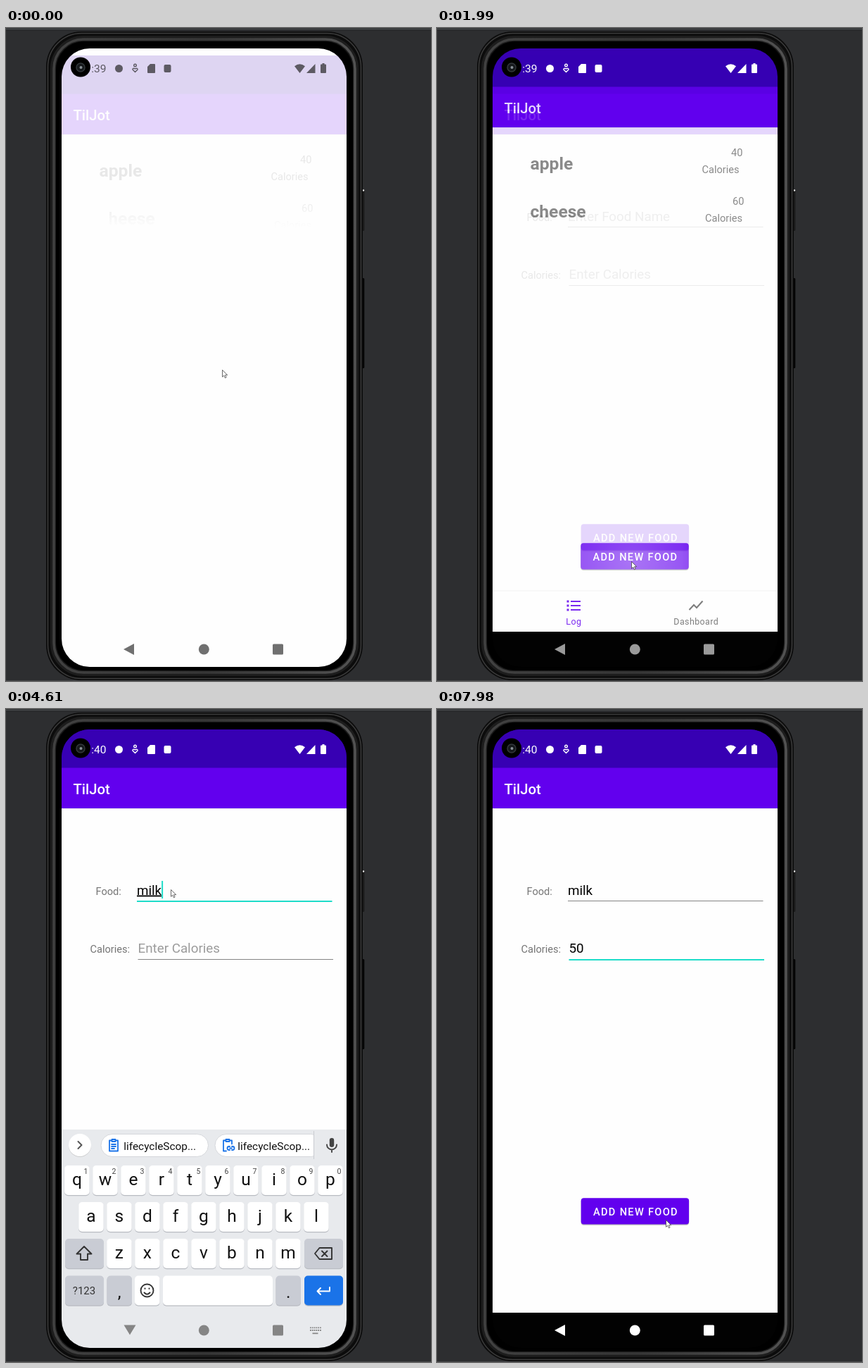
These frames come from a looping animation (604 px wide and 927 px high, 8 s). An HTML page:

```html
<!DOCTYPE html>
<html lang="en">
<head>
<meta charset="utf-8">
<title>Food log</title>
<style>
html, body { margin: 0; width: 604px; height: 927px; overflow: hidden; background: #2d2e30; }
svg { display: block; }
text { font-family: Roboto, sans-serif; white-space: pre; }
.grey { fill: #757575; }
.small { font-size: 14.6px; }
.food { font-size: 24.6px; font-weight: 700; }
.field { font-size: 18.8px; }
.hint { fill: #9c9c9c; }
.btn { font-size: 14.6px; font-weight: 500; letter-spacing: 1.31px; fill: #fff; }
.tab { font-size: 12.4px; letter-spacing: .45px; text-anchor: middle; }
.key { font-size: 24.5px; text-anchor: middle; fill: #111; }
.num { font-size: 10.5px; text-anchor: middle; fill: #444; }
.chip { font-size: 15.4px; fill: #111; }
.line { fill: none; stroke-linecap: round; stroke-linejoin: round; }
</style>
</head>
<body>
<svg width="604" height="927" viewBox="0 0 604 927">
  <defs>
    <clipPath id="screen"><rect x="79" y="29" width="405" height="878" rx="40"/></clipPath>
    <clipPath id="windowClip"><rect x="79" y="29" width="405" height="828"/></clipPath>
    <clipPath id="btnClip"><rect x="204.300" y="731.200" width="153.400" height="37.200" rx="4"/></clipPath>
    <clipPath id="chipClip"><rect x="79" y="597" width="358.500" height="60"/></clipPath>
    <radialGradient id="glow">
      <stop offset="0" stop-color="#fff" stop-opacity=".36"/>
      <stop offset=".6" stop-color="#fff" stop-opacity=".22"/>
      <stop offset="1" stop-color="#fff" stop-opacity="0"/>
    </radialGradient>
    <linearGradient id="fade" x2="0" y2="1">
      <stop offset="0" stop-color="#fefefe" stop-opacity="0"/>
      <stop offset=".07" stop-color="#fefefe"/>
    </linearGradient>
    <linearGradient id="rim" x2="1" y2="0">
      <stop offset="0" stop-color="#414141"/>
      <stop offset=".5" stop-color="#363636"/>
      <stop offset="1" stop-color="#525252"/>
    </linearGradient>
    <g id="bars">
      <rect x="79" y="141" width="405" height="716" fill="#fefefe"/>
      <rect x="79" y="141" width="405" height="1" opacity=".08"/>
      <rect x="79" y="29" width="405" height="55" fill="#3700b3"/>
      <rect x="79" y="83.500" width="405" height="57.500" fill="#6200ee"/>
      <text x="95.500" y="120.500" font-size="20.300" font-weight="500" fill="#fff">TilJot</text>
    </g>
    <g id="button">
      <rect x="204.300" y="733" width="153.400" height="37.200" rx="4" opacity=".1"/>
      <rect x="204.300" y="732.200" width="153.400" height="37.200" rx="4" opacity=".2"/>
      <rect x="204.300" y="731.200" width="153.400" height="37.200" rx="4" fill="#6200ee"/>
    </g>
  </defs>

  <rect width="604" height="927" fill="#2d2e30"/>
  <rect width="604" height="3" fill="#3b3d3f"/>
  <rect y="3" width="604" height="1" fill="#222325"/>

  <!-- phone body -->
  <rect x="505" y="230" width="4.300" height="58" rx="1.500" fill="#1a1a1a"/>
  <rect x="505" y="355" width="4.300" height="128" rx="1.500" fill="#050505"/>
  <circle cx="508" cy="230.500" r="1.200" fill="#eee"/>
  <rect x="57" y="5" width="450" height="921" rx="50" fill="#0c0c0c"/>
  <rect x="59.500" y="7.500" width="445" height="916" rx="48" class="line" stroke="#3c3c3c" stroke-width="1.500"/>
  <rect x="67" y="15" width="430" height="901" rx="43" class="line" stroke="#1d1d1d" stroke-width="8"/>
  <rect x="68" y="16" width="428" height="899" rx="42" class="line" stroke="url(#rim)" stroke-width="3.500"/>
  <rect x="71" y="19" width="422" height="893" rx="41"/>
  <rect y="926" width="604" height="1" fill="#454648"/>

  <g clip-path="url(#screen)">
    <rect id="base" x="79" y="29" width="405" height="828" fill="#fefefe"/>
    <rect id="navBg" x="79" y="857" width="405" height="50"/>

    <g clip-path="url(#windowClip)">
      <g id="log">
        <use href="#bars"/>
        <g class="grey">
          <text x="132.500" y="200.500" class="food">apple</text>
          <text x="132.500" y="269" class="food">cheese</text>
          <g class="small">
            <text x="418" y="182">40</text><text x="376.500" y="206">Calories</text>
            <text x="420" y="250.500">60</text><text x="381" y="274.500">Calories</text>
          </g>
        </g>
        <use href="#button"/>
        <g clip-path="url(#btnClip)"><circle id="ripple" cx="276" cy="755" r="0" fill="url(#glow)"/></g>
        <text x="221.500" y="755.500" class="btn">ADD NEW FOOD</text>
        <rect x="79" y="798.500" width="405" height="1" fill="#f1f1f1"/>
        <g fill="#6200ee">
          <path d="M184.500 812.500h3v3h-3zm5.500 .5h14v2h-14zm-5.500 5.500h3v3h-3zm5.500 .5h14v2h-14zm-5.500 5.500h3v3h-3zm5.500 .5h14v2h-14z"/>
          <text x="194.300" y="847" class="tab">Log</text>
        </g>
        <path d="M358.500 826l6.500-7 4 4 8.500-9.500" fill="none" stroke="#666" stroke-width="2"/>
        <text x="368.300" y="847" class="tab" fill="#666">Dashboard</text>
      </g>
      <g id="veil">
        <rect x="79" y="238" width="405" height="662" fill="url(#fade)"/>
        <rect x="130" y="252" width="17" height="32" fill="#fefefe"/>
      </g>

      <g id="form">
        <use href="#bars"/>
        <text x="127.500" y="264" class="small grey">Food:</text>
        <text x="119.500" y="346" class="small grey">Calories:</text>
        <rect id="foodLine" x="186" width="277.500"/>
        <rect id="calLine" x="187.500" width="277.500"/>
        <text id="food" x="186" y="263.500" class="field"></text>
        <text id="cal" x="187.500" y="346" class="field"></text>
        <rect id="caret" width="2" height="25" fill="#1fdcc9"/>
        <use href="#button" x=".4" y="-37"/>
        <text x="222" y="718.500" class="btn">ADD NEW FOOD</text>
      </g>
    </g>

    <g id="keyboard">
      <rect x="79" y="597" width="405" height="330" fill="#e8eaed"/>
      <circle cx="105" cy="620" r="16" fill="#bbb" opacity=".6"/>
      <circle cx="105" cy="619" r="16" fill="#fff"/>
      <path d="M102.500 614l5 5-5 5" class="line" stroke="#555" stroke-width="2"/>
      <g clip-path="url(#chipClip)">
        <g id="chipA"></g>
        <g id="chipB"></g>
      </g>
      <rect x="437" y="599" width="1" height="40" fill="#c9cbd0"/>
      <rect x="459.800" y="609" width="6.400" height="13" rx="3.200" fill="#444"/>
      <path d="M456 618.500a7 7 0 0 0 14 0M463 626v3" class="line" stroke="#444" stroke-width="1.900"/>
      <g id="keys"></g>
      <g class="line" stroke="#333" stroke-width="1.900">
        <path d="M111 763l-10.500 10.500h5.500v8.500h10v-8.500h5.500z"/>
        <path d="M445.500 765h17.500v16h-17.500l-6.500-8zM449 769.500l7.500 7.500m0-7.500l-7.500 7.500"/>
        <circle cx="200.500" cy="825.500" r="9"/>
        <path d="M196.500 828.500q4 4.500 8 0M197.500 822.500v.5M203.500 822.500v.5"/>
        <path d="M460 821v5.500h-17.500m4.500-4.500l-4.500 4.500 4.500 4.500" stroke="#fff"/>
      </g>
    </g>

    <g id="nav">
      <path id="back"/>
      <circle cx="281.300" cy="882" r="7.500"/>
      <rect x="379" y="874.500" width="15" height="15" rx="1.500"/>
      <g id="switcher"></g>
    </g>

    <g id="status">
      <text id="clock" x="142.500" y="63" font-size="15.500" text-anchor="end"></text>
      <circle cx="160.500" cy="57.500" r="5.500"/>
      <g fill="none" stroke="currentColor" stroke-width="1.400">
        <circle cx="183.500" cy="53" r="1.800"/>
        <path d="M183.500 62.500l-3.600-3.600q0-2.600 3.600-1 3.600-1.600 3.600 1z"/>
      </g>
      <path d="M205 51h6q1 0 1 1v11q0 1-1 1h-9q-1 0-1-1v-8z"/>
      <rect x="224.500" y="52" width="10" height="11" rx="2"/>
      <path d="M410 54.300q7.500-6 15 0l-7.500 9.700zM427 64l12.500-13v13zM447 52.500q0-1 1-1h1.500v-1.500h3v1.500h1.500q1 0 1 1v10.500q0 1-1 1h-6q-1 0-1-1z"/>
    </g>
  </g>

  <circle cx="106" cy="55.500" r="14"/>
  <circle cx="106" cy="56" r="6" fill="#16191c" stroke="#33383c" stroke-width="1.500"/>
  <circle cx="106.500" cy="56" r="2" fill="#8a9298"/>

  <path id="cursor" d="M.5 .5v9.800l2.300-2 1.600 3.500 1.700-.8-1.600-3.300h3.200z" fill="#fff" stroke="#444" stroke-width=".8"/>
</svg>
<script>
const LOOP = 8000;
const TEAL = '#1fdcc9';
const $ = id => document.getElementById(id);
const set = (id, attrs) => {
  for (const k in attrs) $(id).setAttribute(k, attrs[k]);
};

// Each track lists [start ms, value...]; a value holds until the next start.
const tracks = {
  cursor: [[0, 307, 485], [870, 332, 530], [990, 361, 610], [1110, 346, 662], [1250, 275, 766],
    [1500, 276, 757], [2110, 265, 600], [2230, 245, 400], [2350, 234, 256],
    [6760, 258, 420], [6880, 273, 640], [7000, 255, 820], [7120, 205, 908], [7240, 175, 892],
    [7360, 173, 883], [7620, 190, 860], [7740, 260, 790], [7860, 318, 738], [7980, 325, 725]],
  log: [[0, .16, 10], [120, .65, 4], [240, 1, 0]],
  form: [[0, 0, 10], [1990, .16, 10], [2110, .7, 4], [2230, 1, 0]],
  keyboard: [[0, 0, 310], [2590, .38, 175], [2710, .85, 50], [2830, 1, 0],
    [7500, .9, 25], [7620, .6, 110], [7740, .2, 220], [7860, 0, 310]],
  chips: [[0, .4], [2710, .8], [2830, 1]],
  navBg: [[0, '#fefefe'], [120, '#5a5a5a'], [240, '#020202']],
  nav: [[0, '#707070'], [120, '#666'], [240, '#5c5c5c'], [500, '#9a9a9a'], [2590, '#b4b4b4'],
    [2710, '#999'], [2830, '#858585'], [7620, '#aaa'], [7740, '#ddd'], [7860, '#fff']],
  status: [[0, '#5d5a63'], [120, '#36284f'], [240, '#1f0b58'], [500, '#fff']],
  ripple: [[0, 0], [1750, 30], [1870, 70], [1990, 120]],
  clock: [[0, '1:39'], [2350, '1:40']],
  food: [[0, ''], [3980, 'm'], [4230, 'mi'], [4370, 'mil'], [4610, 'milk']],
  cal: [[0, ''], [6020, '5'], [6140, '50']],
  caret: [[0, 0], [2470, 1], [3080, 0], [3460, 1], [5750, 0], [6020, 1], [6640, 0], [7120, 1], [7620, 0]]
};
const at = (name, t) => tracks[name].findLast(k => k[0] <= t).slice(1);

function key(x, y, w, fill, label = '', cls = 'key', dy = 28) {
  return `<rect x="${x}" y="${y + 1.2}" width="${w}" height="42" rx="5" fill="#b9bcc2"/>
    <rect x="${x}" y="${y}" width="${w}" height="42" rx="5" fill="${fill}"/>
    <text x="${x + w / 2}" y="${y + dy}" class="${cls}">${label}</text>`;
}

function buildKeys() {
  const grey = '#c9ccd4', white = '#fff';
  const rows = [['qwertyuiop', 83.2, 648], ['asdfghjkl', 103.2, 700], ['zxcvbnm', 143.2, 752]];
  let out = '';
  for (const [letters, x, y] of rows)
    [...letters].forEach((c, i) => { out += key(x + i * 40, y, 35.5, white, c); });
  for (let i = 0; i < 10; i++)
    out += `<text x="${113.5 + i * 40}" y="660" class="num">${(i + 1) % 10}</text>`;
  out += key(84, 752, 55, grey) + key(424, 752, 55, grey) + key(84, 804.5, 55, grey)
    + key(143.5, 804.5, 35.5, grey, ',', 'key', 31) + key(183, 804.5, 35.5, white)
    + key(223, 804.5, 156, white) + key(383.5, 804.5, 35.5, grey, '.', 'key', 31)
    + key(424, 804.5, 55, '#1a73e8')
    + '<text x="111" y="831" text-anchor="middle" font-size="15" fill="#333">?123</text>';
  $('keys').innerHTML = out;
}

function buildChip(id, x, extra) {
  $(id).innerHTML = `<rect x="${x}" y="603.5" width="152.500" height="32" rx="16" fill="#fff" stroke="#d5d7db"/>
    <g transform="translate(${x + 11} 610)" class="line" stroke="#1a73e8" stroke-width="1.800">
    <path d="M4.500 2.500h-3.500v15h${extra ? 4 : 12}M9.500 2.500h3.500v${extra ? 5 : 15}M4.500 1h5v3h-5z"/>
    <path d="${extra ? 'M10 11h-1a2.500 2.500 0 0 0 0 5h1m3-5h1a2.500 2.500 0 0 1 0 5h-1m-3-2.500h3' : 'M4 8h6M4 11h6M4 14h4'}"/></g>
    <text x="${x + 32.3}" y="625.500" class="chip">lifecycleScop...</text>`;
}

function buildSwitcher() {
  let d = 'M435.500 885.500h8v1.800h-8z';
  for (let r = 0; r < 2; r++)
    for (let c = 0; c < 6; c++) d += `M${432 + c * 2.8} ${877.5 + r * 3.6}h1.800v1.800h-1.800z`;
  $('switcher').innerHTML = `<path d="${d}"/>`;
}

function drawField(id, t, hint, active, y) {
  const [value] = at(id, t);
  const el = $(id);
  el.textContent = value || hint;
  el.classList.toggle('hint', !value);
  set(id + 'Line', { y, height: active ? 2 : 1, fill: active ? TEAL : '#858585' });
  if (active) {
    const end = value ? el.getComputedTextLength() : 0;
    set('caret', { x: +el.getAttribute('x') + end, y: y - 28 });
  }
}

function draw(t) {
  for (const id of ['log', 'form', 'keyboard']) {
    const [opacity, dy] = at(id, t);
    set(id, { opacity, transform: `translate(0 ${dy})` });
  }
  set('cursor', { transform: `translate(${at('cursor', t).join(' ')})` });
  set('base', { opacity: t < 240 ? 1 : 0 });
  set('veil', { opacity: t < 120 ? 1 : 0 });
  set('navBg', { fill: at('navBg', t)[0] });
  set('ripple', { r: at('ripple', t)[0] });

  const [scale] = at('chips', t);
  set('chipA', { transform: `translate(211 619) scale(${scale}) translate(-211 -619)` });
  set('chipB', { opacity: scale < .5 ? 0 : 1 });

  const [ink] = at('status', t);
  set('status', { fill: ink, color: ink });
  $('clock').textContent = at('clock', t)[0];

  const typing = t >= 2710 && t < 7620;
  set('nav', { fill: at('nav', t)[0] });
  set('back', { d: typing ? 'M167.500 874.500h17l-8.500 14z' : 'M167 882l15-8v16z' });
  set('switcher', { opacity: t >= 2590 && t < 7740 ? 1 : 0 });

  drawField('food', t, 'Enter Food Name', t >= 2470 && t < 5130, 272);
  drawField('cal', t, 'Enter Calories', t >= 5130, 355);
  $('food').style.textDecoration = t >= 4230 && t < 5130 ? 'underline' : 'none';
  set('caret', { opacity: at('caret', t)[0] });
}

buildKeys();
buildChip('chipA', 135, false);
buildChip('chipB', 297, true);
buildSwitcher();

const start = performance.now();
function tick() {
  draw((performance.now() - start) % LOOP);
  requestAnimationFrame(tick);
}
tick();
</script>
</body>
</html>
```
